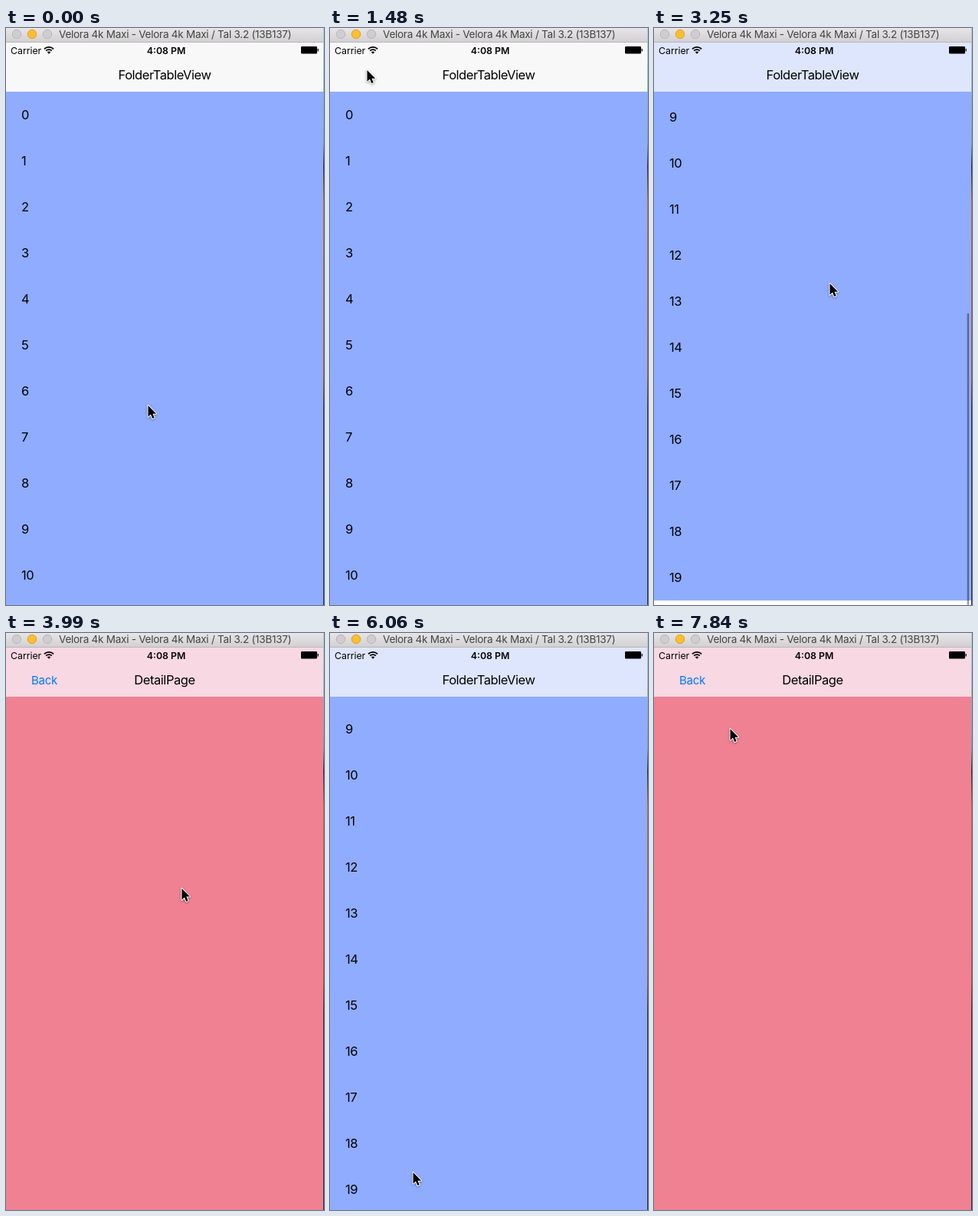
Animation, 415 px wide and 752 px high, one loop 7.99 s. Source, as an HTML page with a canvas:

```html
<!DOCTYPE html>
<html lang="en">
<head>
<meta charset="utf-8">
<title>Folding table view</title>
<style>
  html, body { margin: 0; width: 100%; height: 100%; overflow: hidden; }
  canvas { display: block; }
</style>
</head>
<body>
<canvas id="stage" width="415" height="752"></canvas>
<script>
const ctx = document.getElementById('stage').getContext('2d');
const W = 414, H = 752, LOOP = 7990, STEP = 148;
const SCREEN = 19, BAR = 83, BOTTOM = 755, ROW = 60, ROWS = 20;
const BLUE = '#90acff', PINK = '#f08193';
const FONT = 'Inter, Roboto, sans-serif';

// Keys are [time, value, value...]; eased between neighbours.
const CURSOR = [
  [0, 185, 491], [420, 185, 491], [1040, 48, 54], [1480, 48, 54],
  [2220, 247, 242], [2400, 247, 242], [3100, 229, 332], [3990, 229, 332],
  [4600, 54, 68], [5200, 54, 68], [5640, 115, 400], [6050, 108, 702],
  [6800, 108, 702], [7500, 100, 149], [7700, 100, 149], [7840, 99, 124]
];
const SCROLL = [
  [2130, 0], [2250, 35], [2360, 115], [2510, 210], [2800, 395],
  [3100, 530], [3250, 537], [3500, 529], [3650, 528]
];
const INDICATOR = [[2120, 0], [2220, 1], [3450, 1], [3690, 0]];
const FOLDS = [
  { open: 90, close: 1114, split: 503 },
  { open: 3600, close: 4736, split: 395 },
  { open: 6420, close: Infinity, split: 755 }
];

const clamp = x => Math.min(1, Math.max(0, x));
const smooth = x => x * x * (3 - 2 * x);
const linear = x => x;

function track(keys, t, ease) {
  const next = keys.findIndex(k => k[0] > t);
  if (next === 0) return keys[0].slice(1);
  if (next < 0) return keys[keys.length - 1].slice(1);
  const a = keys[next - 1], b = keys[next];
  const f = ease((t - a[0]) / (b[0] - a[0]));
  return a.slice(1).map((v, i) => v + (b[i + 1] - v) * f);
}

function rect(x, y, w, h, fill) {
  ctx.fillStyle = fill;
  ctx.fillRect(x, y, w, h);
}

function text(str, x, y, size, { color = '#000', align = 'left', weight = 400, spacing = 0, alpha = 1 } = {}) {
  ctx.globalAlpha = alpha;
  ctx.font = `${weight} ${size}px ${FONT}`;
  ctx.letterSpacing = spacing + 'px';
  ctx.textAlign = align;
  ctx.fillStyle = color;
  ctx.fillText(str, x, y);
  ctx.globalAlpha = 1;
}

function clipped(top, bottom, draw) {
  ctx.save();
  ctx.beginPath();
  ctx.rect(0, top, W, bottom - top);
  ctx.clip();
  draw();
  ctx.restore();
}

function list(top, lines) {
  rect(0, top, W, ROWS * ROW, BLUE);
  for (let i = 0; i < ROWS; i++) {
    const y = top + i * ROW;
    if (lines) rect(20, Math.round(y + ROW), W - 20, 1, 'rgba(0,0,0,.025)');
    text(String(i), 20, y + 36, 16.5, { spacing: -0.45 });
  }
}

function content(fold, scroll, lines) {
  const { p, split, edge } = fold;
  const top = BAR - scroll;
  const low = split + (BOTTOM - split) * p;
  rect(0, SCREEN, W, H - SCREEN, p ? PINK : '#fff');
  if (!p) return list(top, lines);
  if (edge > SCREEN) clipped(SCREEN, edge, () => list(top + edge - split));
  if (low < H) clipped(low, H, () => list(top + low - split));
}

// Frosted bar: grey, tinted by whatever slides beneath it.
function navBar(fold, scroll, t) {
  const { p, split, edge } = fold;
  clipped(SCREEN, BAR, () => {
    rect(0, SCREEN, W, BAR - SCREEN, '#f8f8f8');
    const top = BAR - scroll + edge - split;
    const seam = edge < BAR ? edge - (BAR - edge) * 0.4 : 900;
    ctx.filter = 'blur(7px)';
    if (top < BAR) rect(-40, top - 25, W + 80, BAR + 65 - top, '#dee6fd');
    if (seam < BAR) rect(-40, seam, W + 80, BAR + 40 - seam, '#f8d8e2');
    ctx.filter = 'none';
  });
  const title = { align: 'center', spacing: -0.45 };
  const pressed = (t > 1030 && t < 1420) || (t > 4690 && t < 5030);
  text('FolderTableView', 207, 67, 16.5, { ...title, alpha: clamp(1 - p * 1.15) });
  text('DetailPage', 207, 67, 16.5, { ...title, alpha: p });
  text('Back', 33, 66.5, 15, { color: '#007aff', spacing: -0.3, alpha: p * (pressed ? 0.2 : 1) });
}

function statusBar() {
  text('Carrier', 6, 34, 12.3);
  text('4:08 PM', 209, 34, 12.3, { align: 'center', weight: 600 });
  ctx.strokeStyle = '#000';
  ctx.lineWidth = 1.8;
  for (const r of [8.6, 5.4]) {
    ctx.beginPath();
    ctx.arc(56, 33.5, r, -Math.PI * 0.75, -Math.PI * 0.25);
    ctx.stroke();
  }
  ctx.fillStyle = '#000';
  ctx.beginPath();
  ctx.moveTo(56, 33.8);
  ctx.arc(56, 33.8, 3.2, -Math.PI * 0.75, -Math.PI * 0.25);
  ctx.fill();
  ctx.beginPath();
  ctx.roundRect(385, 24, 21, 9.5, 1.2);
  ctx.fill();
  rect(406.6, 27, 1.2, 3.5, '#000');
}

function windowFrame() {
  const shade = ctx.createLinearGradient(0, 0, 0, SCREEN);
  shade.addColorStop(0, '#e7e5e7');
  shade.addColorStop(1, '#d1cfd1');
  rect(0, 0, W, SCREEN, shade);
  rect(0, SCREEN - 1, W, 1, '#b9b7b9');
  [['#cfcdcf', '#b8b6b8'], ['#fdbe2f', '#dfa023'], ['#cfcdcf', '#b8b6b8']].forEach(([fill, line], i) => {
    ctx.beginPath();
    ctx.arc(14 + i * 20, 8, 5.7, 0, Math.PI * 2);
    ctx.fillStyle = fill;
    ctx.strokeStyle = line;
    ctx.lineWidth = 1;
    ctx.fill();
    ctx.stroke();
  });
  text('Velora 4k Maxi - Velora 4k Maxi / Tal 3.2 (13B137)', 69, 13, 13.5, { color: '#444', spacing: -0.25 });

  const strip = ctx.createLinearGradient(0, 0, 0, H);
  [[0, '#a5cbdc'], [0.2, '#7896a5'], [0.24, '#20252c'], [0.3, '#b5603c'],
    [0.6, '#9c4a34'], [0.66, '#33241f'], [1, '#1c2c40']].forEach(s => strip.addColorStop(...s));
  rect(W, 0, 1, H, strip);
}

function pointer(x, y) {
  ctx.save();
  ctx.translate(x + 0.5, y + 1);
  ctx.beginPath();
  [[0, 0], [0, 14.8], [3.4, 11.6], [5.8, 17], [8.2, 16], [5.9, 10.7], [10.6, 10.7]]
    .forEach(p => ctx.lineTo(...p));
  ctx.closePath();
  ctx.lineJoin = 'round';
  ctx.lineWidth = 2;
  ctx.strokeStyle = '#fff';
  ctx.shadowColor = 'rgba(0,0,0,.4)';
  ctx.shadowBlur = 3;
  ctx.shadowOffsetY = 1;
  ctx.stroke();
  ctx.shadowColor = 'transparent';
  ctx.fillStyle = '#000';
  ctx.fill();
  ctx.restore();
}

function foldAt(t) {
  const { open, close, split } = FOLDS.findLast(f => t >= f.open) || FOLDS[0];
  const p = smooth(clamp((t - open) / 300)) * (1 - smooth(clamp((t - close) / 290)));
  return { p, split, edge: split - (split - SCREEN) * p };
}

function render(t) {
  const fold = foldAt(t);
  const [scroll] = track(SCROLL, t, linear);
  const [glow] = track(INDICATOR, t, linear);
  content(fold, scroll, scroll > 0 && scroll < 300);
  if (glow) {
    const top = 85 + scroll * 0.534;
    ctx.globalAlpha = glow;
    ctx.fillStyle = 'rgba(0,0,0,.4)';
    ctx.beginPath();
    ctx.roundRect(408.7, top, 2.4, Math.min(752, top + 387) - top, 1.2);
    ctx.fill();
    ctx.globalAlpha = 1;
  }
  navBar(fold, scroll, t);
  statusBar();
  windowFrame();
  pointer(...track(CURSOR, t, smooth));
}

const start = performance.now();
function tick() {
  const t = (performance.now() - start) % LOOP;
  render(Math.floor((t + 10) / STEP) * STEP);
  requestAnimationFrame(tick);
}
tick();
</script>
</body>
</html>
```
